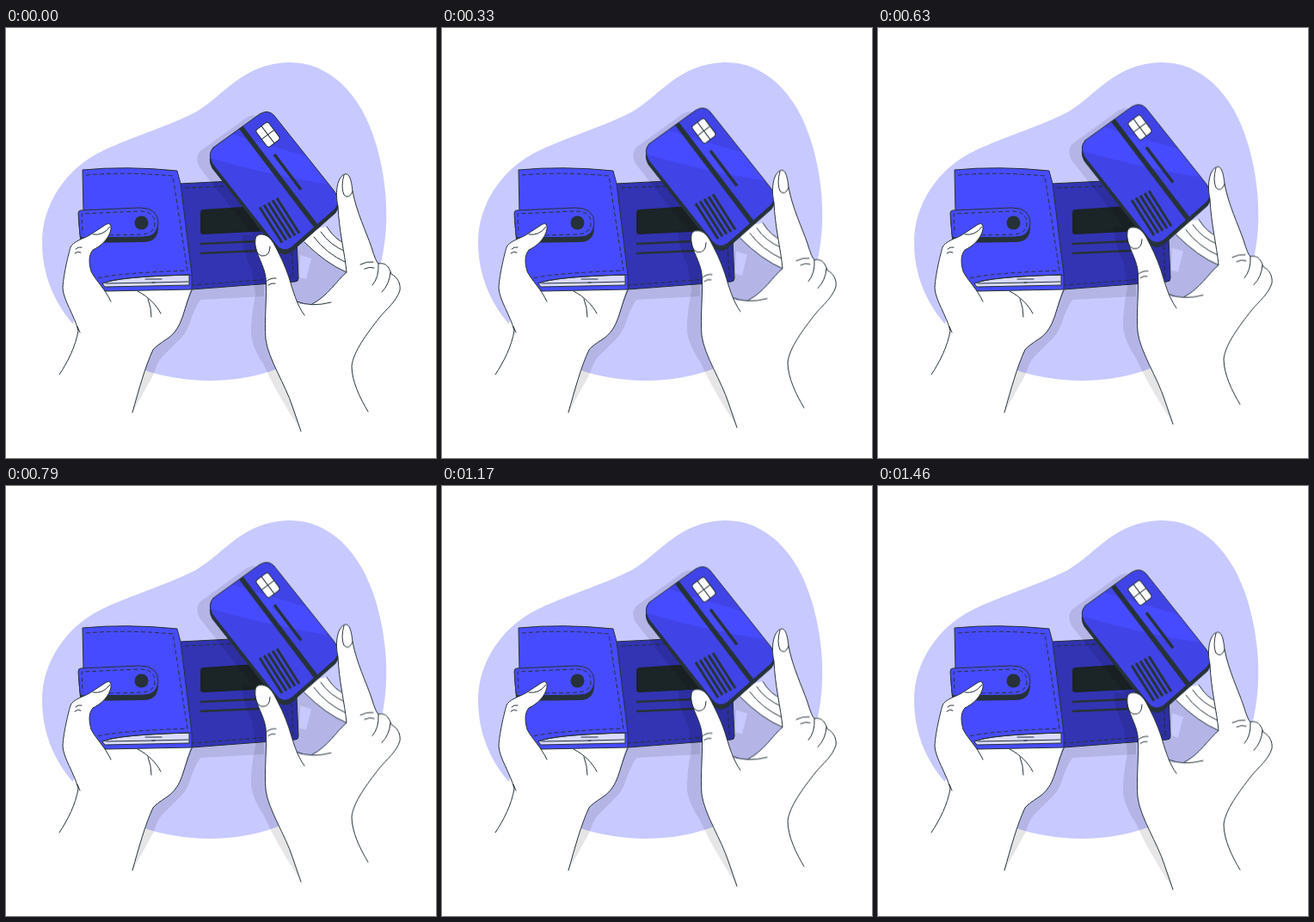
Animation of 500 by 500 pixels, one loop 1500 ms. Source, as an HTML page:

```html
<!DOCTYPE html>
<html lang="en">
<head>
<meta charset="utf-8">
<title>Card and wallet</title>
<style>
  html, body { margin: 0; width: 100%; height: 100%; overflow: hidden; background: #fff; }
  svg { display: block; width: 100%; height: 100%; }
  .line { fill: none; stroke: #263238; stroke-width: 1; stroke-linecap: round; stroke-linejoin: round; }
  .stitch { fill: none; stroke: #263238; stroke-width: 1; stroke-dasharray: 5 3; }
  .bar { fill: none; stroke: #263238; }
  .skin { fill: #fff; }
  .ink { fill: #263238; }
  .blue { fill: #474bff; }
  .edge { stroke: #263238; stroke-width: 1; stroke-linejoin: round; }
  .shade { opacity: .1; }
</style>
</head>
<body>
<svg viewBox="0 0 500 500">
  <defs>
    <path id="face" d="M241 139 L295 100 Q305 94 312 102 L382 190 Q390 201 383 210 L332 255 Q322 262 314 252 L240 158 Q234 147 241 139Z"/>
    <path id="flap" d="M87 212 L155 209 Q177 209 177 227 Q176 243 160 243 L89 244 Q86 244 86 240 L84 216 Q84 212 87 212Z"/>
    <clipPath id="faceClip"><use href="#face"/></clipPath>
  </defs>

  <path fill="#c8c9ff" d="M328 40 C374 39 412 74 430 134 C445 185 447 240 432 288 C405 355 330 411 236 410 C126 409 42 341 42 249 C42 205 70 163 112 143 C155 123 190 114 222 97 C255 77 275 42 328 40Z"/>

  <!-- left palm -->
  <path class="shade" d="M216 304 L300 299 V312 L226 316 Q218 328 213 345 Q209 356 200 364 L181 383 Q175 390 172 402 L147 447 L165 370Z"/>
  <path class="skin" d="M62 403 L90 300 H216 C205 330 206 348 188 361 Q174 370 171 374 C162 393 154 422 147 447 H115Z"/>
  <path class="line" d="M216 305 C205 330 206 348 188 361 Q174 370 171 374 C162 393 154 422 147 447 M153 306 C165 312 175 322 180 332 M165 315 Q169 325 169 336"/>

  <!-- wallet -->
  <path class="edge" fill="#3234b3" d="M202 181 L262 178 L335 176 L340 291 Q340 295 336 295 L216 304Z"/>
  <path class="stitch" d="M208 186 L328 181 L334 290 L216 299"/>
  <path fill="#1b2427" d="M230 211 L305 206 L308 236 L229 240 Q226 240 226 236 V215 Q226 211 230 211Z"/>
  <path class="bar" stroke-width="2.5" d="M226 251 L291 248 M226 262 L294 259"/>
  <path class="blue edge" d="M89 165 Q140 160 199 166 L203 181 L216 287 V304 L116 306 L97 285 L90 215Z"/>
  <path class="edge" fill="#dadbff" d="M112 297 Q130 289 213 287 V299 L115 301Z"/>
  <path class="line" d="M112 297 Q130 289 216 287 M116 297 L173 296 M162 292 L181 292 M170 296 L212 295"/>
  <path class="stitch" d="M93 171 Q140 167 194 172 L211 282 Q130 285 106 291"/>
  <use href="#flap" class="ink" y="6"/>
  <use href="#flap" class="blue edge"/>
  <path class="stitch" d="M120 241 L158 240 Q173 239 173 227 Q173 213 155 213 L88 216 L89 240"/>
  <circle class="ink" cx="157.500" cy="226.500" r="8"/>

  <!-- left thumb -->
  <path class="skin" d="M62 403 C72 388 81 370 84 352 C80 335 66 315 66 302 C67 285 73 262 75 255 C78 248 90 245 97 241 L117 228 Q123 226 122 234 C120 245 110 254 101 258 C95 265 97 276 99 283 C103 292 115 303 122 318 L100 403Z"/>
  <path class="line" d="M62 403 C72 388 81 370 84 352 C80 335 66 315 66 302 C67 285 73 262 75 255 C78 248 90 245 97 241 L117 228 Q123 226 122 234 C120 245 110 254 101 258 C95 265 97 276 99 283 C103 292 115 303 122 318 M83 347 L86 354 M101 240 Q113 242 121 231 M81 257 Q84 254 88 255 M80 262 Q83 259 87 261"/>

  <g id="lifted">
    <g class="shade">
      <use href="#face" x="-15" y="4"/>
      <path fill-rule="evenodd" d="M274 240 Q276 262 286 282 L290 310 Q284 340 285 358 Q288 375 300 392 Q314 424 343 468 L400 330 V262 L350 245Z M342 264 L355 268 L349 292 L341 290Z"/>
    </g>

    <!-- fingers behind the card -->
    <path class="skin" d="M347 249 Q372 274 396 284 L394 250 Q383 247 373 231 L350 235Z"/>
    <path class="line" d="M347 249 Q372 274 396 284 M358 243 Q372 262 396 273 M366 237 Q376 252 395 260 M373 231 Q383 247 394 250"/>

    <use href="#face" class="ink edge" y="5"/>
    <use href="#face" fill="#4044e6"/>
    <path class="blue" clip-path="url(#faceClip)" d="M230 147 L262 123 Q300 135 352 150 L376 182 Q300 170 234 150Z"/>
    <g class="bar" clip-path="url(#faceClip)">
      <path stroke-width="5.500" d="M272 114 L364 235"/>
      <path stroke-width="3.500" d="M312 147 L343 188"/>
      <path id="bars" stroke-width="3"/>
    </g>
    <use href="#face" class="line"/>
    <g transform="translate(304.500 124) rotate(-37)">
      <rect class="skin edge" x="-9" y="-12.500" width="18" height="25" rx="3"/>
      <path class="line" d="M-9 0 H9 M0 -12 V12"/>
    </g>

    <!-- right hand -->
    <path class="skin" d="M343 469 L333 440 C325 415 305 385 302 362 C300 340 304 310 302 290 C300 275 291 265 289 248 Q290 239 298 240 C304 241 307 244 311 250 C318 263 324 275 329 290 C333 303 337 318 342 321 L356 321 C374 312 385 293 396 284 C394 262 387 235 386 207 C382 190 386 172 394 170 C400 168 402 180 403 190 C408 215 418 235 425 255 Q430 272 433 274 C443 272 446 280 448 286 C456 290 459 298 458 305 C454 318 443 326 434 337 C420 355 404 376 402 393 C402 411 412 431 421 446Z"/>
    <path class="line" d="M343 469 L333 440 C325 415 305 385 302 362 C300 340 304 310 302 290 C300 275 291 265 289 248 Q290 239 298 240 C304 241 307 244 311 250 C318 263 324 275 329 290 C333 303 338 322 347 334 M338 318 Q355 325 378 319 M356 321 C374 312 385 293 396 284 C394 262 387 235 386 207 C382 190 386 172 394 170 C400 168 402 180 403 190 C408 215 418 235 425 255 Q430 272 433 274 C443 272 446 280 448 286 C456 290 459 298 458 305 C454 318 443 326 434 337 C420 355 404 376 402 393 C402 411 412 431 421 446"/>
    <path class="line" d="M290 244 Q288 262 297 265 Q307 266 307 254 M393 171 Q389 185 393 194 Q399 200 403 190 M302 295 Q308 290 314 291 M305 299 Q309 296 313 297 M412 275 Q420 271 427 272 M417 280 Q423 277 428 279 M433 274 Q434 290 426 299 M447 284 Q446 298 437 307"/>
  </g>
</svg>
<script>
  const LOOP = 1500, RISE = 10, LEAD = 30;
  const lifted = document.getElementById('lifted');

  let bars = '';
  for (let i = 0; i < 5; i++) bars += `M${295 + 5 * i} ${208.5 - 2.7 * i} l26 41`;
  document.getElementById('bars').setAttribute('d', bars);

  function draw(now) {
    const phase = ((now + LEAD) % LOOP) / LOOP;
    const lift = RISE * (1 - Math.abs(1 - 2 * phase));
    lifted.setAttribute('transform', `translate(0 ${0.4 - lift})`);
    requestAnimationFrame(draw);
  }
  draw(performance.now());
</script>
</body>
</html>
```
